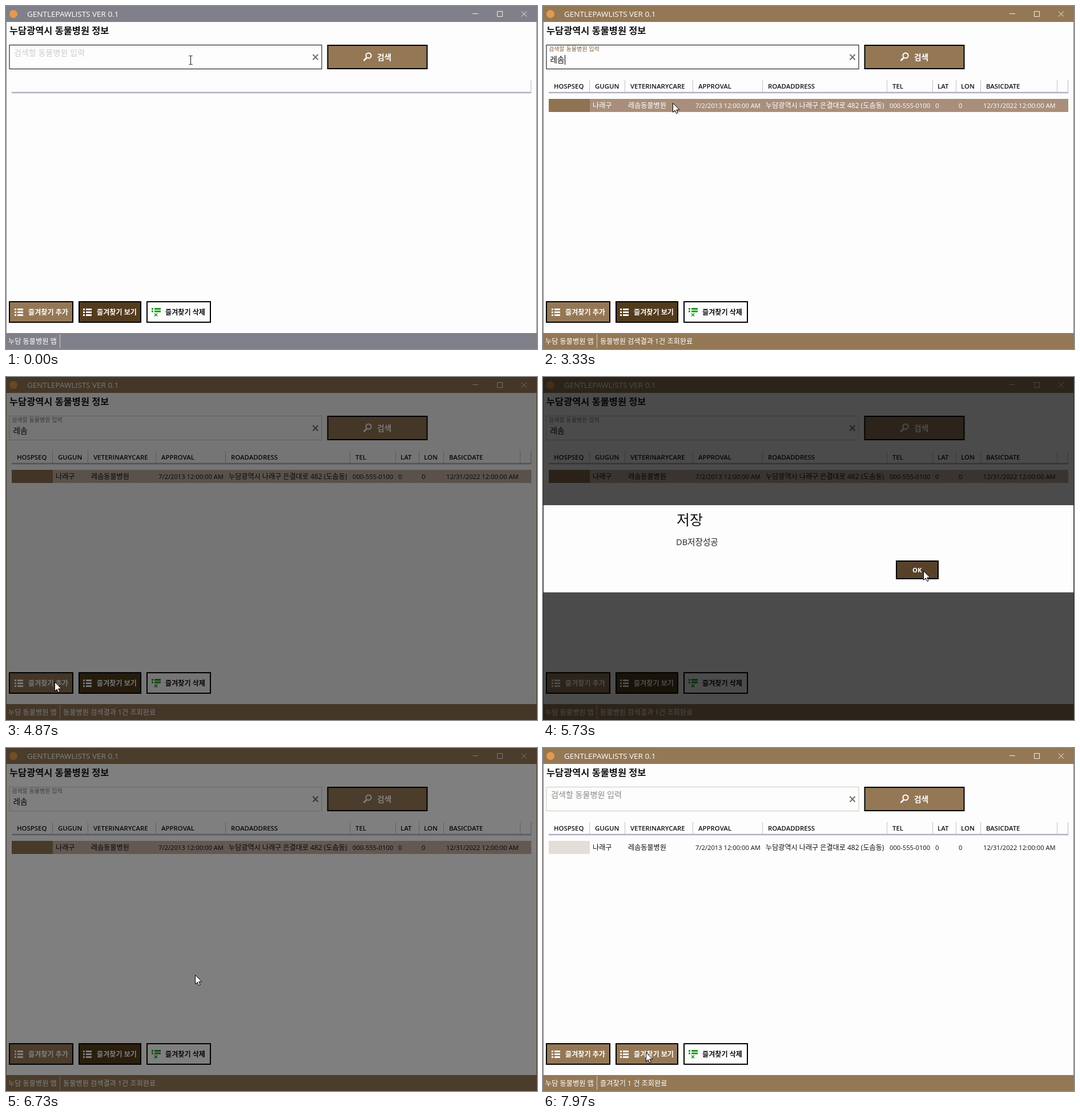
An HTML page for the animation above (8000 ms loop, 930x602 px).

```html
<!DOCTYPE html>
<html lang="ko">
<head>
<meta charset="utf-8">
<style>
  html, body { margin: 0; width: 100%; height: 100%; overflow: hidden; background: #fdfdfd; }
  svg { display: block; width: 930px; height: 602px; }
  text { font-family: "Open Sans", "Noto Sans CJK KR", "Noto Sans CJK", sans-serif; white-space: pre; }
  .bold { font-weight: 700; }
  .line { fill: none; stroke-width: 1; }
</style>
</head>
<body>
<svg id="stage" viewBox="0 0 930 602">
  <defs>
    <g id="list">
      <path d="M0 1.5h3M0 6.5h3M0 11.5h3" stroke-width="3"/>
      <path d="M5 1.5h10M5 6.5h10M5 11.5h10" stroke-width="3"/>
    </g>
  </defs>
  <rect width="930" height="602" fill="#fdfdfd"/>
  <g id="chrome">
    <rect width="930" height="28"/>
    <rect y="574" width="930" height="28"/>
    <rect width="1" height="602"/>
    <rect x="929" width="1" height="602"/>
  </g>
  <circle cx="13" cy="14" r="7" fill="#e39a4c"/>
  <path class="line" stroke="#f4f1ec" d="M817 13.5h10M860.500 9.500h9v9h-9zM903 9.500l9 9M912 9.500l-9 9"/>
  <g id="labels"></g>

  <rect id="box" class="line" x="6" y="68.500" width="547" height="42"/>
  <path d="M537.500 85l9 9.500M546.500 85l-9 9.500" stroke="#77776a" stroke-width="2.200"/>
  <g id="search">
    <rect x="563.500" y="69" width="174" height="41" fill="#947856" stroke="#000" stroke-width="2"/>
    <circle cx="635" cy="87" r="4.600" fill="none" stroke="#fff" stroke-width="2"/>
    <path d="M631.500 91l-5 5" stroke="#fff" stroke-width="2.600"/>
  </g>

  <path d="M10 152h910" stroke="#b1b1c0" stroke-width="2.500"/>
  <path class="line" stroke="#b9b9c6" d="M919.500 130v21"/>
  <g id="table">
    <path id="separators" class="line" stroke="#c2c2cb"/>
    <rect id="rowFill" x="81" y="163" width="839" height="23"/>
    <rect id="cellFill" x="10" y="163" width="72" height="23"/>
    <g id="heads"></g>
    <g id="cells"></g>
  </g>

  <g stroke="#000" stroke-width="2">
    <rect x="6" y="519" width="111" height="36" fill="#947856"/>
    <rect id="viewButton" x="128" y="519" width="108" height="36"/>
    <rect x="247" y="519" width="111" height="36" fill="#fdfdfd"/>
  </g>
  <use href="#list" x="15" y="531" stroke="#fff"/>
  <use href="#list" x="135" y="531" stroke="#fff"/>
  <path d="M255 531.500h3M260 531.500h11M255 536h3M260 536h11" stroke="#169a16" stroke-width="3"/>
  <path d="M260 539.500l5 5M265 539.500l-5 5" stroke="#169a16" stroke-width="1.600"/>
  <g id="buttonLabels"></g>
  <path class="line" stroke="#d8d0c4" d="M94.500 576v24"/>

  <rect id="composeBlock" width="13" height="18" fill="#6a6262"/>
  <g id="inputs"></g>
  <path id="caret" class="line" stroke="#000"/>

  <rect id="shade" width="930" height="602"/>
  <g id="dialog">
    <rect x="1" y="225" width="928" height="153" fill="#fdfdfd"/>
    <rect x="619" y="323" width="73" height="31" fill="#574229" stroke="#000" stroke-width="2"/>
  </g>
  <path id="arrow" d="M.5.5v16l3.700-3.500 2.500 5.700 2.500-1.100-2.500-5.500h5.200z" fill="#fff" stroke="#000"/>
  <path id="beam" class="line" stroke="#111" d="M-3 -7.500h2.500l.5.500.5-.5H3M0-7V7M-3 7.500h2.500L0 7l.5.500H3"/>
</svg>
<script>
const el = id => document.getElementById(id);
const ACCENT = '#947856';

function addText(parent, x, y, size, fill, content, className = '') {
  const node = document.createElementNS('http://www.w3.org/2000/svg', 'text');
  const attrs = { x, y, fill, 'font-size': size, class: className };
  for (const name in attrs) node.setAttribute(name, attrs[name]);
  node.textContent = content;
  el(parent).append(node);
  return node;
}
const set = (node, name, value) => node.setAttribute(name, value);
const show = (node, visible) => { node.style.display = visible ? '' : 'none'; };
const clamp = v => Math.min(1, Math.max(0, v));
const ramp = (t, from, to) => clamp((t - from) / (to - from));

addText('labels', 37, 19, 13.5, '#fff', 'GENTLEPAWLISTS VER 0.1');
addText('labels', 6, 49, 16.4, '#111', '누담광역시 동물병원 정보', 'bold');
addText('labels', 4, 592.5, 12.2, '#fff', '누담 동물병원 앱');
const status = addText('labels', 100, 592.5, 12.2, '#fff', '');
addText('search', 650, 94.5, 13.7, '#fff', '검색', 'bold');
addText('buttonLabels', 39, 541.5, 12.1, '#fff', '즐겨찾기 추가', 'bold');
addText('buttonLabels', 159, 541.5, 12.1, '#fff', '즐겨찾기 보기', 'bold');
addText('buttonLabels', 279, 541.5, 12.1, '#111', '즐겨찾기 삭제', 'bold');
const hint = addText('inputs', 14, 87, 14.1, '#888', '검색할 동물병원 입력');
const floatLabel = addText('inputs', 10, 79, 10.1, '#77695a', '검색할 동물병원 입력');
const typed = addText('inputs', 12.5, 99, 13.7, '#111', '');
const composing = addText('inputs', 12.5, 88, 13.7, '#111', '');
addText('dialog', 234, 260, 25, '#111', '저장');
addText('dialog', 233, 295, 14.6, '#222', 'DB저장성공');
addText('dialog', 647, 342.5, 11.2, '#fff', 'OK', 'bold');

// header, header x, cell text, cell x, cell font size
const columns = [
  ['HOSPSEQ', 19, '', 0, 12],
  ['GUGUN', 91, '나래구', 87, 12.1],
  ['VETERINARYCARE', 153, '레솜동물병원', 149, 12.1],
  ['APPROVAL', 272, '7/2/2013 12:00:00 AM', 267, 11.2],
  ['ROADADDRESS', 394, '누담광역시 나래구 은결대로 482 (도솜동)', 390, 12.1],
  ['TEL', 612, '000-555-0100', 607, 11.2],
  ['LAT', 691, '0', 687, 11.2],
  ['LON', 732, '0', 728, 11.2],
  ['BASICDATE', 776, '12/31/2022 12:00:00 AM', 771, 11.2],
];
for (const [head, headX, cell, cellX, size] of columns) {
  const node = addText('heads', headX, 145, 11.4, '#111', head);
  node.style.fontWeight = 600;
  addText('cells', cellX, 179, size, 'inherit', cell).removeAttribute('fill');
}
set(el('separators'), 'd',
  [81, 143, 262, 384, 602, 682, 723, 766, 900].map(x => `M${x + .5} 130v21`).join(''));

const pointerPath = [
  [0, 323, 95], [300, 323, 95], [900, 321, 90], [2750, 321, 90], [3250, 227, 170],
  [3600, 227, 170], [4350, 84, 535], [4850, 84, 535], [5600, 666, 340],
  [6350, 666, 340], [6730, 331, 398], [7350, 180, 534], [8000, 180, 534],
];
function pointerAt(t) {
  const i = pointerPath.findIndex(([time]) => time > t);
  const [t0, x0, y0] = pointerPath[i - 1], [t1, x1, y1] = pointerPath[i];
  const p = ramp(t, t0, t1), e = p * p * (3 - 2 * p);
  return [x0 + (x1 - x0) * e, y0 + (y1 - y0) * e];
}

// start time, committed text, syllable being composed
const typing = [
  [0, '', ''], [1230, '', 'ㄹ'], [1450, '', '레'], [1700, '', '렛'],
  [1900, '레', '소'], [2150, '레', '솜'], [2450, '레솜', ''], [7700, '', ''],
];

const ACTIVATE = 700, RESULT = 2680, SELECT = 3220, LEAVE_BOX = 3450, SAVE = 4577, RELOAD = 7700;

function draw(t) {
  const [x, y] = pointerAt(t);
  const inside = (l, top, r, b) => x >= l && x <= r && y >= top && y <= b;
  const overBox = inside(6, 68, 553, 111);
  const focused = t >= ACTIVATE && t < LEAVE_BOX;

  set(el('chrome'), 'fill', t < ACTIVATE ? '#80808a' : ACCENT);
  set(el('box'), 'stroke', focused || overBox ? '#000' : '#cbcbb6');
  set(el('viewButton'), 'fill', inside(127, 518, 237, 556) && t > 7000 ? ACCENT : '#533c1d');

  const [, text, syllable] = typing.findLast(([start]) => t >= start);
  const composeX = 12 + text.length * 12.6;
  typed.textContent = text;
  composing.textContent = syllable;
  set(composing, 'x', composeX + .5);
  set(composing, 'y', text ? 99 : 88);
  set(el('composeBlock'), 'x', composeX);
  set(el('composeBlock'), 'y', text ? 85 : 74);
  show(el('composeBlock'), syllable);
  show(floatLabel, text);
  show(hint, !text && !syllable);
  set(hint, 'fill', t < RELOAD ? '#ccc' : '#8a8a8a');
  set(floatLabel, 'fill', focused ? '#806440' : '#77777c');
  set(el('caret'), 'd', text ? 'M38.500 86v17' : 'M12.500 75v17');
  show(el('caret'), focused && !syllable && (t - 3200 + 5300) % 1060 < 530);

  show(el('table'), t >= RESULT);
  const selected = t >= SELECT && t < RELOAD;
  const pale = t >= SAVE - 30;
  set(el('rowFill'), 'fill', !selected ? 'none' : pale ? '#c4afa3' : '#a98f7b');
  set(el('cellFill'), 'fill', selected ? '#8f7352' : '#e5ded8');
  set(el('cells'), 'fill', selected && !pale ? '#fff' : '#111');
  status.textContent = t < RESULT ? '' : t < RELOAD ? '동물병원 검색결과 1건 조회완료' : '즐겨찾기 1 건 조회완료';

  set(el('shade'), 'opacity', .7 * (ramp(t, SAVE, 4960) - ramp(t, 6630, 6980)));
  show(el('dialog'), t >= 4950 && t < 6600);

  show(el('beam'), overBox);
  show(el('arrow'), !overBox);
  set(el('beam'), 'transform', `translate(${Math.round(x) + .5} ${Math.round(y)})`);
  set(el('arrow'), 'transform', `translate(${Math.round(x)} ${Math.round(y)})`);
}

function tick() {
  draw(performance.now() % 8000);
  requestAnimationFrame(tick);
}
tick();
</script>
</body>
</html>
```
